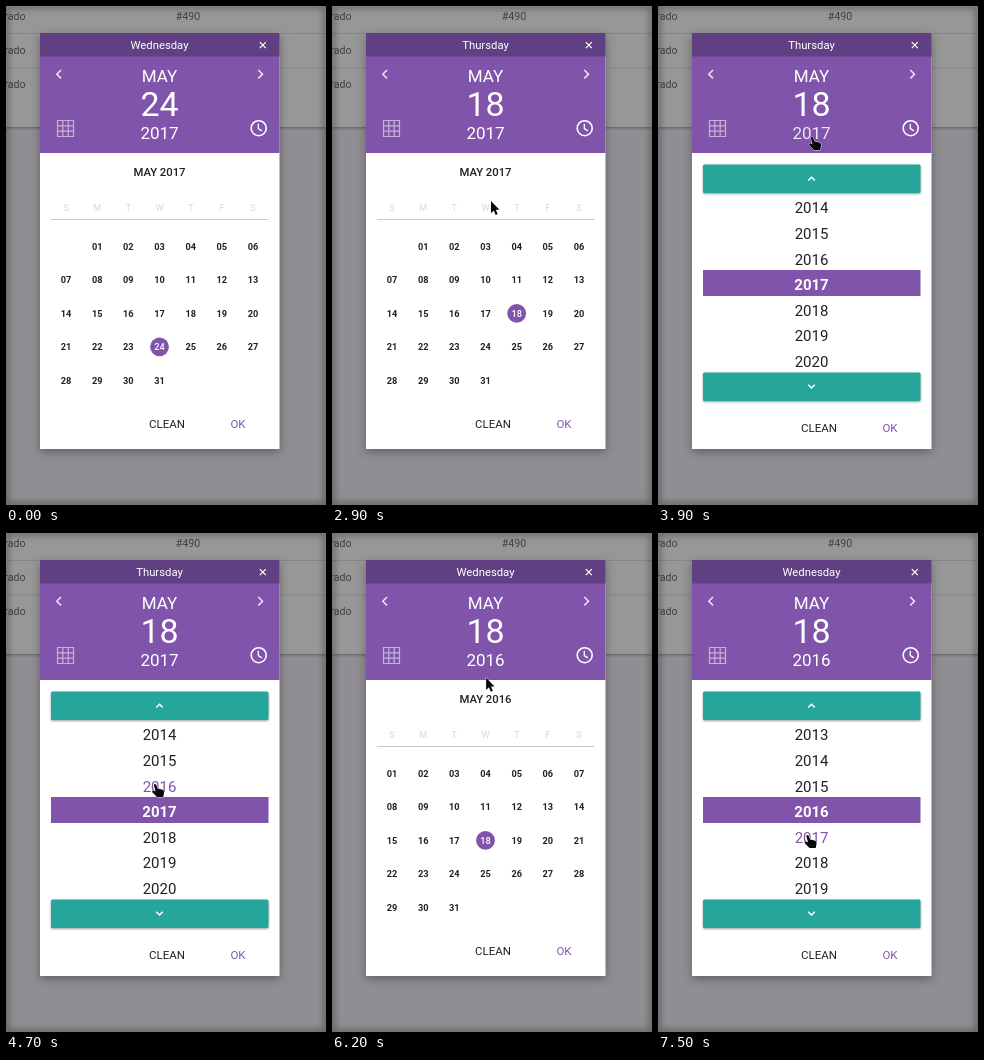
Write an HTML page that moves like this. It is 320 px wide and 499 px high and loops after 8 s.

```html
<!DOCTYPE html>
<html lang="en">
<head>
<meta charset="utf-8">
<title>Date picker</title>
<style>
html, body { margin: 0; height: 100%; overflow: hidden; background: #908e92; }
svg { display: block; width: 100vw; height: 100vh; font-family: Roboto, Arial, sans-serif; }
.table { filter: drop-shadow(0 1px 1.5px #0005); }
.modal { filter: drop-shadow(0 3px 5px #0005); }
.button { filter: drop-shadow(0 1px 1.2px #0006); }
.edge { fill: none; stroke: #000; stroke-opacity: .35; stroke-width: 5; filter: blur(3px); }
</style>
</head>
<body>
<svg id="stage" viewBox="0 0 320 499" preserveAspectRatio="none"></svg>
<script>
const LOOP = 8000, STEP = 100, MID = 153.5;
const PURPLE = '#8054aa', DARK = '#604083', INK = '#202124';
const stage = document.getElementById('stage');

// Pointer position: time, x, y
const path = [
  [1100, 296, 284], [1300, 248, 295], [1600, 190, 306], [1800, 182, 308],
  [2600, 182, 308], [2900, 159, 195], [3200, 153, 109], [3500, 153, 130],
  [3700, 154, 131], [4200, 154, 131], [4700, 149, 251], [5600, 149, 251],
  [6300, 155, 127], [6800, 155, 127], [7500, 149.5, 302], [8000, 149.5, 302]
];

function pointerAt(t) {
  if (t < path[0][0]) return null;
  const i = path.findIndex(p => p[0] > t);
  const [t0, x0, y0] = path[i - 1], [t1, x1, y1] = path[i];
  const k = (t - t0) / (t1 - t0);
  return { x: x0 + (x1 - x0) * k, y: y0 + (y1 - y0) * k };
}

const text = (s, x, y, size, fill = '#fff', weight = 400, extra = '') =>
  `<text x="${x}" y="${y + size * .356}" font-size="${size}" font-weight="${weight}" fill="${fill}" text-anchor="middle" ${extra}>${s}</text>`;
const rect = (x, y, w, h, fill, extra = '') =>
  `<rect x="${x}" y="${y}" width="${w}" height="${h}" fill="${fill}" ${extra}/>`;
const line = (d, width = 1.5, opacity = 1, color = '#fff') =>
  `<path d="${d}" fill="none" stroke="${color}" stroke-width="${width}" opacity="${opacity}"/>`;

const cellX = col => 60 + 31.17 * col;
const cellY = row => 240.5 + 33.45 * row;
const yearY = i => 202 + 25.6 * i;
const within = (v, a, b) => v >= a && v < b;

function backdrop() {
  const left = [10, 44, 78].map(y => text('rado', 19.5, y, 10.6, '#414042', 400, 'style="text-anchor:end"'));
  return rect(0, 0, 320, 499, '#908e92') +
    rect(-5, -5, 330, 126, '#989797', 'class="table"') +
    line('M0 27.5H320M0 62H320', 1, 1, '#868586') +
    left.join('') + text('#490', 182, 10, 10.6, '#414042') +
    '<rect width="320" height="499" class="edge"/>';
}

function header(s, p) {
  const hover = p && Math.abs(p.x - MID) < 20 && within(p.y, 118, 137);
  return rect(34, 27, 239.5, 416, '#fff', 'class="modal"') +
    rect(34, 27, 239.5, 120, PURPLE) + rect(34, 27, 239.5, 23.5, DARK) +
    text(s.weekday, MID, 38.7, 11.3) +
    line('M253.8 36.2l6 6m0-6l-6 6', 1.2) +
    line('M55 64l-4.2 4.2 4.2 4.2M252.3 64l4.2 4.2-4.2 4.2', 1.5, .85) +
    text('MAY', MID, 70, 17) + text(s.day, MID, 98, 34) +
    text(s.year, MID, 126.5, 17, '#fff', 400, hover ? 'opacity=".85"' : '') +
    line('M51.5 114.5h16v16h-16zM56.8 114.5v16M62.2 114.5v16M51.5 119.8h16M51.5 125.2h16', 1.2, .55) +
    '<circle cx="252.7" cy="122.2" r="7.5" fill="none" stroke="#fff" stroke-width="1.6"/>' +
    line('M252.3 117.8v4.8l3.6 2.3', 1.3);
}

function calendar(s) {
  let out = text('MAY ' + s.year, MID, 166.3, 11.3, INK, 500);
  [...'SMTWTFS'].forEach((c, i) => out += text(c, cellX(i), 202, 9.2, '#dfdfe3', 500));
  out += line('M45 213.5H262.5', 1, 1, '#c9c8cb');
  const first = new Date(s.year, 4, 1).getDay();
  for (let d = 1; d <= 31; d++) {
    const n = d + first - 1, x = cellX(n % 7), y = cellY(Math.floor(n / 7)), on = d === s.day;
    if (on) out += `<circle cx="${x}" cy="${y}" r="9.4" fill="${PURPLE}"/>`;
    out += text(String(d).padStart(2, '0'), x, y, 9.2, on ? '#fff' : INK, on ? 500 : 700);
  }
  return out;
}

function years(s, p) {
  const button = (y, chevron) => {
    const hot = p && within(p.y, y, y + 28.5);
    return rect(45, y, 217.5, 28.5, hot ? '#2bbbad' : '#26a69a', 'rx="1.5" class="button"') + line(chevron);
  };
  let out = rect(45, 264, 217.5, 26, PURPLE);
  for (let i = 0; i < 7; i++) {
    const y = yearY(i), on = i === 3;
    const hot = p && within(p.y, y - 12.8, y + 12.8);
    out += text(s.year - 3 + i, MID, y, 15, on ? '#fff' : hot ? PURPLE : INK, on ? 700 : 400);
  }
  return out + button(158.5, 'M150.2 174.5l3.3-3.3 3.3 3.3') + button(366.5, 'M150.2 378.7l3.3 3.3 3.3-3.3');
}

function clickable(p, picking) {
  if (Math.abs(p.x - MID) < 20 && within(p.y, 84, 137)) return true;
  if (picking) return within(p.y, 158, 395);
  const row = Math.round((p.y - 240.5) / 33.45), col = Math.round((p.x - 60) / 31.17);
  return within(row, 0, 5) && within(col, 0, 7) && Math.hypot(p.x - cellX(col), p.y - cellY(row)) < 10.5;
}

function pointer(p, hand) {
  const d = hand
    ? 'M-1.2 1Q0-1 1.2.7L2.6 4.6 7 5.4Q9.3 6 9 9L8.2 13H2L-2.7 8.2Q-3.4 6.2-1.2 6.6L.6 7.4Z'
    : 'M0 0V12.2L2.8 9.6 4.7 14 6.7 13.1 4.8 8.8H8.4Z';
  return `<path transform="translate(${p.x} ${p.y})" d="${d}" fill="#080808" stroke="#fff" stroke-width=".8" paint-order="stroke"/>`;
}

function draw(t) {
  const p = pointerAt(t);
  const picking = within(t, 3900, 5200) || t >= 6700;
  const s = {
    weekday: within(t, 2100, 5200) ? 'Thursday' : 'Wednesday',
    day: t < 2100 ? 24 : 18,
    year: t < 5200 ? 2017 : 2016
  };
  const footY = picking ? 421.5 : 417.5;
  stage.innerHTML = backdrop() + header(s, p) + (picking ? years(s, p) : calendar(s)) +
    text('CLEAN', 161, footY, 11.5, INK) + text('OK', 232, footY, 11.5, PURPLE) +
    (p ? pointer(p, clickable(p, picking)) : '');
}

let shown = -1;
const start = performance.now();
function tick() {
  const t = Math.floor((performance.now() - start) % LOOP / STEP) * STEP;
  if (t !== shown) draw(shown = t);
  requestAnimationFrame(tick);
}
tick();
</script>
</body>
</html>
```
